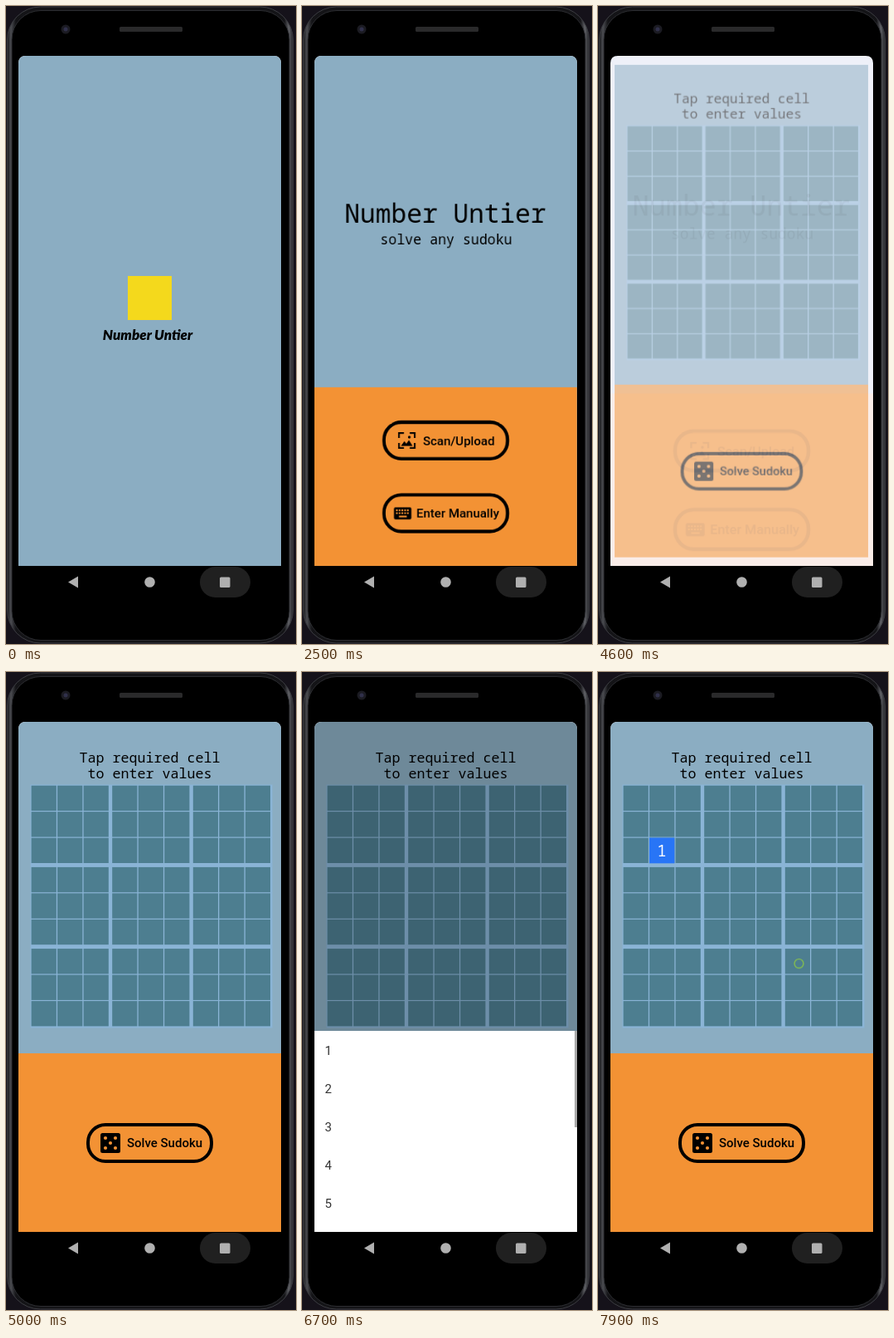
An HTML page that plays this animation: 350 by 768 pixels, repeating every 8 s.

```html
<!DOCTYPE html>
<html lang="en">
<head>
<meta charset="utf-8">
<title>Puzzle app on a phone</title>
<style>
  html, body { margin: 0; width: 100%; height: 100%; overflow: hidden; background: #15121a; }
  svg { display: block; width: 350px; height: 768px; }
  .mono { font-family: "Noto Sans Mono", "DejaVu Sans Mono", monospace; }
  .ui { font-family: Roboto, Inter, sans-serif; font-size: 15px; }
  .label { font-weight: 500; }
  .mid { text-anchor: middle; }
  .sky { fill: #8badc2; }
  .warm { fill: #f39234; }
  .pill { fill: none; stroke: #000; stroke-width: 4; }
  .ring { fill: none; stroke: #83bd50; stroke-width: 1.4; vector-effect: non-scaling-stroke;
          transform-box: fill-box; transform-origin: center; }

  .page { transform-origin: 173.5px 367px; }
  #splash { animation: splash 8s linear infinite; }
  #home { animation: home 8s linear infinite; }
  #entry { animation: entry 8s linear infinite; }
  #dim { animation: dim 8s linear infinite; }
  #sheet { animation: sheet 8s linear infinite; }
  #value { animation: value 8s step-end infinite; }
  #tap1 { animation: tap1 8s linear infinite; }
  #tap2 { animation: tap2 8s linear infinite; }

  /* Pages open by growing and fading in while the old one swells and fades. */
  @keyframes splash {
    0%, 21.25% { opacity: 1; transform: scale(1); }
    23.1% { opacity: .12; transform: scale(1.08); }
    23.5% { opacity: 0; }
    26.25%, 100% { opacity: 0; transform: scale(1.15); }
  }
  @keyframes home {
    0%, 21.25% { opacity: 0; transform: scale(.85); }
    21.9% { opacity: 0; }
    23.1% { opacity: .5; transform: scale(.965); }
    24.1% { opacity: 1; }
    26.25%, 55.625% { opacity: 1; transform: scale(1); }
    57.5% { opacity: .12; transform: scale(1.08); }
    57.9% { opacity: 0; }
    60.625%, 100% { opacity: 0; transform: scale(1.15); }
  }
  @keyframes entry {
    0%, 55.625% { opacity: 0; transform: scale(.85); }
    56.3% { opacity: 0; }
    57.5% { opacity: .5; transform: scale(.965); }
    58.5% { opacity: 1; }
    60.625%, 100% { opacity: 1; transform: scale(1); }
  }
  @keyframes dim {
    0%, 78.1% { opacity: 0; }
    80.6%, 90% { opacity: .21; }
    93.1%, 100% { opacity: 0; }
  }
  @keyframes sheet {
    0% { transform: translateY(243px); }
    78.1% { transform: translateY(243px); animation-timing-function: cubic-bezier(0, 0, .2, 1); }
    81.25% { transform: none; }
    90% { transform: none; animation-timing-function: cubic-bezier(.4, 0, 1, 1); }
    93.1%, 100% { transform: translateY(243px); }
  }
  @keyframes value {
    0% { opacity: 0; }
    90.6%, 100% { opacity: 1; }
  }
  @keyframes tap1 {
    0%, 73.7% { opacity: 0; transform: scale(.4); }
    73.75% { opacity: 1; transform: scale(.4); }
    75% { opacity: 1; transform: scale(1); }
    76.25%, 100% { opacity: 0; transform: scale(1.4); }
  }
  @keyframes tap2 {
    0%, 98.1% { opacity: 0; transform: scale(.4); }
    98.15% { opacity: 1; transform: scale(.4); }
    98.75% { opacity: 1; transform: scale(.68); }
    100% { opacity: 1; transform: scale(1); }
  }
</style>
</head>
<body>
<svg viewBox="0 0 350 768">
  <defs>
    <clipPath id="screen">
      <path d="M15 674V69q0-9 9-9H323q9 0 9 9V674z"/>
    </clipPath>
    <linearGradient id="rim">
      <stop offset="0" stop-color="#17181b"/>
      <stop offset=".013" stop-color="#4c4d52"/>
      <stop offset=".03" stop-color="#141417"/>
      <stop offset=".97" stop-color="#141417"/>
      <stop offset=".985" stop-color="#606166"/>
      <stop offset="1" stop-color="#222327"/>
    </linearGradient>
  </defs>

  <!-- Phone body -->
  <rect width="350" height="768" fill="#15121a"/>
  <rect x="1.5" y="1" width="345" height="766" rx="40" fill="url(#rim)" stroke="#3c3d42"/>
  <rect x="7" y="5.5" width="335" height="758" rx="35" fill="#000" stroke="#2c2d31"/>
  <circle cx="72" cy="28" r="5.5" fill="#1b1b22"/>
  <circle cx="72" cy="28" r="2.5" fill="#30304a"/>
  <rect x="137" y="25" width="76" height="6" rx="1.5" fill="#2a2a2b"/>

  <!-- Navigation bar -->
  <rect x="234" y="675" width="61" height="37" rx="18.5" fill="#202020"/>
  <g fill="#b0b0b0">
    <path d="M75 693.5L87 686.500V700.500z"/>
    <circle cx="173.500" cy="693.500" r="6.300"/>
    <rect x="258" y="687.500" width="12.500" height="12.500" rx="1.500"/>
  </g>

  <g clip-path="url(#screen)">
    <rect x="15" y="60" width="317" height="614" fill="#fbf9ff"/>

    <g id="splash" class="page">
      <rect class="sky" x="15" y="60" width="317" height="614"/>
      <rect x="147" y="325" width="53" height="53" fill="#f4d91c"/>
      <text class="mid" x="171" y="402" font-family="Lato, sans-serif" font-size="17"
            font-weight="900" font-style="italic">Number Untier</text>
    </g>

    <g id="home" class="page">
      <rect class="sky" x="15" y="60" width="317" height="400"/>
      <rect class="warm" x="15" y="459" width="317" height="215"/>
      <g class="mono mid">
        <text x="173" y="260.500" font-size="31.200">Number Untier</text>
        <text x="174" y="287" font-size="16.600">solve any sudoku</text>
      </g>
      <rect class="pill" x="99" y="501" width="149" height="44" rx="21"/>
      <path d="M117 520V514H123M130 514H136V520M136 526V532H130M123 532H117V526"
            fill="none" stroke="#000" stroke-width="2"/>
      <path d="M119.500 529.500L123.500 524L126 527L129 522.500L133.500 529.500z"/>
      <circle cx="129.500" cy="519" r="1.600"/>
      <text class="ui label" x="146" y="528.500">Scan/Upload</text>
      <rect class="pill" x="99" y="588.500" width="149" height="44" rx="21"/>
      <rect x="111" y="603.500" width="21" height="14.500" rx="2"/>
      <path d="M113.500 607H130M113.500 610.500H130" stroke="#f39234" stroke-width="2" stroke-dasharray="2 1.300"/>
      <path d="M117 614.500H126.500" stroke="#f39234" stroke-width="2"/>
      <text class="ui label" x="138" y="616">Enter Manually</text>
    </g>

    <g id="entry" class="page">
      <rect class="sky" x="15" y="60" width="317" height="400"/>
      <rect class="warm" x="15" y="459" width="317" height="215"/>
      <g class="mono mid" font-size="16.700">
        <text x="173.500" y="108.500">Tap required cell</text>
        <text x="173.500" y="127.500">to enter values</text>
      </g>
      <rect x="29.500" y="135.500" width="292" height="293" fill="#8ab4d6"/>
      <g id="cells" fill="#4d7e90"></g>
      <g id="value">
        <rect x="62" y="199.500" width="30.300" height="30.800" fill="#2875f6"/>
        <text class="mono mid" x="77" y="222" font-size="19" fill="#fff">1</text>
      </g>
      <rect class="pill" x="99" y="545" width="149" height="44" rx="21"/>
      <rect x="114" y="555" width="24" height="24" rx="2.500"/>
      <g id="pips" class="warm"></g>
      <text class="ui label" x="146" y="572">Solve Sudoku</text>
    </g>

    <rect id="dim" x="15" y="60" width="317" height="614"/>
    <g id="sheet">
      <rect x="15" y="432" width="317" height="243" fill="#fff"/>
      <g id="list" class="ui" fill="#333"></g>
      <rect x="329" y="432" width="3" height="116" fill="#a9a9a9"/>
    </g>

    <circle id="tap1" class="ring" cx="64" cy="201" r="8"/>
    <circle id="tap2" class="ring" cx="242.500" cy="351" r="8"/>
  </g>
</svg>
<script>
  const add = (parent, tag, attrs, text = "") => {
    const el = document.createElementNS("http://www.w3.org/2000/svg", tag);
    for (const key in attrs) el.setAttribute(key, attrs[key]);
    el.textContent = text;
    document.getElementById(parent).append(el);
  };

  // Nine columns and rows, with a wider gap after every third.
  const place = (start, i, block) => start + Math.floor(i / 3) * block + (i % 3) * 31.5;
  for (let row = 0; row < 9; row++) {
    for (let col = 0; col < 9; col++) {
      add("cells", "rect", {
        x: place(30.6, col, 97.6), y: place(136.7, row, 98.2), width: 30.2, height: 30.3
      });
    }
  }

  for (const [dx, dy] of [[-1, -1], [1, -1], [0, 0], [-1, 1], [1, 1]]) {
    add("pips", "circle", { cx: 126 + dx * 6, cy: 567 + dy * 6, r: 2.1 });
  }

  for (let n = 1; n <= 5; n++) add("list", "text", { x: 27.5, y: 414.5 + n * 46 }, n);
</script>
</body>
</html>
```
